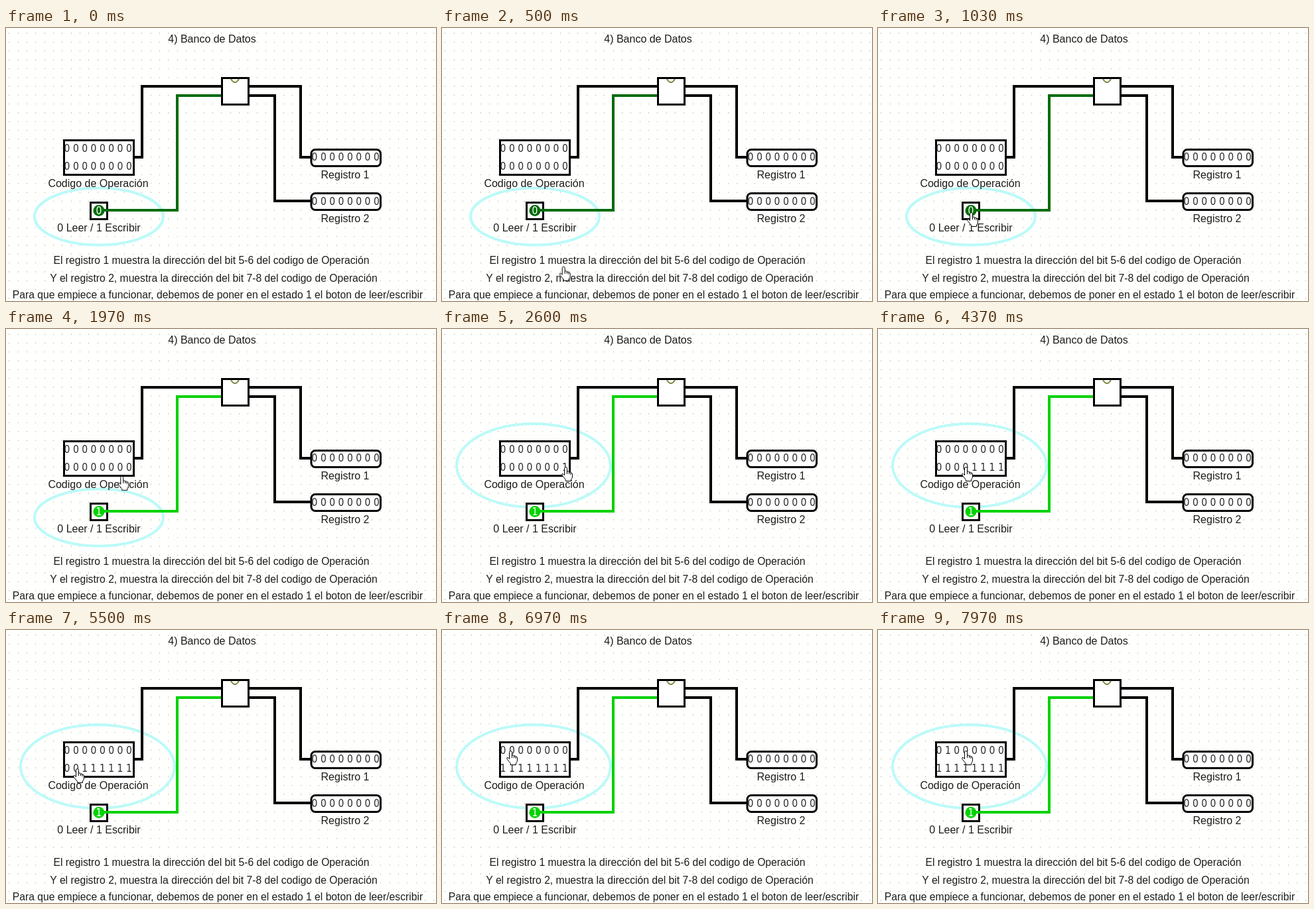
Recreate the animation shown at these times as an HTML page. Size 648 by 412 pixels, loop 8000 ms.

```html
<!DOCTYPE html>
<html lang="es">
<head>
<meta charset="utf-8">
<title>Banco de Datos</title>
<style>
  html, body { margin: 0; width: 100%; height: 100%; overflow: hidden; background: #fffffd; }
  svg { display: block; width: 648px; height: 412px; }
  text { font: 16px "Liberation Sans", Arial, sans-serif; text-anchor: middle; fill: #1c1c1c; }
  .note { font-size: 15.7px; }
  .digit { font: 15.5px "DejaVu Sans Condensed", "DejaVu Sans", sans-serif; font-stretch: condensed; fill: #2c2c2c; }
  .dots { stroke: #b4b4a8; stroke-width: 1.33; fill: none; }
  .box { fill: #fff; stroke: #000; stroke-width: 3; }
  .wire { fill: none; stroke: #000; stroke-width: 4; }
  .ring { fill: none; stroke: #bbfaf8; stroke-width: 4; }
  .low { --level: #006c08; }
  .high { --level: #00d200; }
  .low .wire, .high .wire { stroke: var(--level); }
  .low circle, .high circle { fill: var(--level); }
  .low text, .high text { fill: #fff; }
  #hand { animation: move 8s infinite; }

  /* Pointer path: enter, flip the switch, then set the bits right to left */
  @keyframes move {
    0%, 3% { transform: translate(205px, 414px); animation-timing-function: ease-in-out; }
    10.4%, 18% { transform: translate(134px, 278px); animation-timing-function: ease-in-out; }
    24.6% { transform: translate(168px, 222px); animation-timing-function: ease-out; }
    28.5%, 33.5% { transform: translate(180px, 208px); }
    35.5%, 38% { transform: translate(167px, 207px); }
    40.5%, 45% { transform: translate(153px, 207px); }
    47%, 50% { transform: translate(140px, 208px); }
    52.5%, 57% { transform: translate(126px, 208px); }
    59%, 62.5% { transform: translate(113px, 209px); }
    66%, 71.5% { transform: translate(101px, 209px); }
    74%, 79% { transform: translate(87px, 208px); }
    84.5%, 91.5% { transform: translate(97px, 182px); }
    95.5% { transform: translate(113px, 182px); animation-timing-function: ease-out; }
    99%, 100% { transform: translate(126px, 182px); }
  }
</style>
</head>
<body>
<svg viewBox="0 0 648 412">
  <path id="dots" class="dots"/>
  <ellipse id="ringSwitch" class="ring" cx="140" cy="284.5" rx="97" ry="43"/>
  <ellipse id="ringCode" class="ring" cx="138" cy="206" rx="116" ry="63"/>

  <path class="wire" d="M192 195H205V88H326M365 88H444V195H460M365 102H405V261H460"/>
  <rect class="box" x="87.5" y="169.5" width="105" height="52"/>
  <rect class="box" x="460" y="183.5" width="104.5" height="25" rx="6"/>
  <rect class="box" x="460" y="249.5" width="104.5" height="25" rx="6"/>
  <rect class="box" x="127.5" y="263.5" width="25" height="25"/>

  <g id="off" class="low">
    <path class="wire" d="M148 275H258V102H325"/>
    <circle cx="140" cy="275.5" r="8.5"/>
    <text class="digit" x="140" y="281">0</text>
  </g>
  <g id="on" class="high">
    <path class="wire" d="M148 275H258V102H325"/>
    <circle cx="140" cy="275.5" r="8.5"/>
    <text class="digit" x="140" y="281">1</text>
  </g>

  <rect class="box" x="325.5" y="75.5" width="40" height="40"/>
  <path d="M339 77Q345 87 351 77" fill="none" stroke="#7c8440" stroke-width="2"/>

  <g id="digits"></g>

  <text x="310.5" y="22">4) Banco de Datos</text>
  <text x="139" y="240">Codigo de Operación</text>
  <text x="140" y="307">0 Leer / 1 Escribir</text>
  <text x="511" y="227">Registro 1</text>
  <text x="511" y="293">Registro 2</text>
  <text class="note" x="309.5" y="356">El registro 1 muestra la dirección del bit 5-6 del codigo de Operación</text>
  <text class="note" x="313" y="383">Y el registro 2, muestra la dirección del bit 7-8 del codigo de Operación</text>
  <text class="note" x="319" y="408">Para que empiece a funcionar, debemos de poner en el estado 1 el boton de leer/escribir</text>

  <g id="hand" stroke="#000" stroke-linejoin="round">
    <path fill="#fff" d="M6.5 .5Q8.5 .5 8.5 2.5V7Q11 6.3 11.5 8Q13.7 7.5 14 9Q16.5 9 16.5 11V15Q16 18 14.5 19V21.5H6.5V19.5L1.5 13.5Q0 11 1 10.5Q2.5 10 4.5 12.5V2.5Q4.5 .5 6.5 .5Z"/>
    <path fill="none" d="M8.5 7V11M11.5 8V11M14 9V12"/>
  </g>
</svg>
<script>
  const LOOP = 8000, GRID = 40 / 3;
  const get = id => document.getElementById(id);

  // Hard switch of visibility at a moment in the loop
  function flip(el, ms, from, to) {
    el.animate(
      { opacity: [from, to, to], offset: [0, ms / LOOP, 1], easing: "steps(1, end)" },
      { duration: LOOP, iterations: Infinity }
    );
  }
  const swap = (before, after, ms) => {
    flip(before, ms, 1, 0);
    flip(after, ms, 0, 1);
  };

  function digit(value, x, y) {
    const el = document.createElementNS("http://www.w3.org/2000/svg", "text");
    el.setAttribute("class", "digit");
    el.setAttribute("x", x);
    el.setAttribute("y", y);
    el.textContent = value;
    get("digits").append(el);
    return el;
  }

  // A row of eight bits; clicks maps a bit index to the time it becomes 1
  function row(x, y, clicks = {}) {
    for (let i = 0; i < 8; i++) {
      const cx = x + i * GRID, zero = digit(0, cx, y);
      if (clicks[i]) swap(zero, digit(1, cx, y), clicks[i]);
    }
  }

  let d = "";
  for (let y = 8; y < 412; y += GRID)
    for (let x = 4.4; x < 648; x += GRID)
      d += `M${Math.round(x)} ${y.toFixed(2)}h1`;
  get("dots").setAttribute("d", d);

  row(92, 187, { 1: 7200 });
  row(92, 214, { 7: 2560, 6: 2930, 5: 3300, 4: 3900, 3: 4450, 2: 4900, 1: 5620, 0: 6150 });
  row(465, 200);
  row(465, 267);

  swap(get("off"), get("on"), 1300);
  swap(get("ringSwitch"), get("ringCode"), 2250);
</script>
</body>
</html>
```
